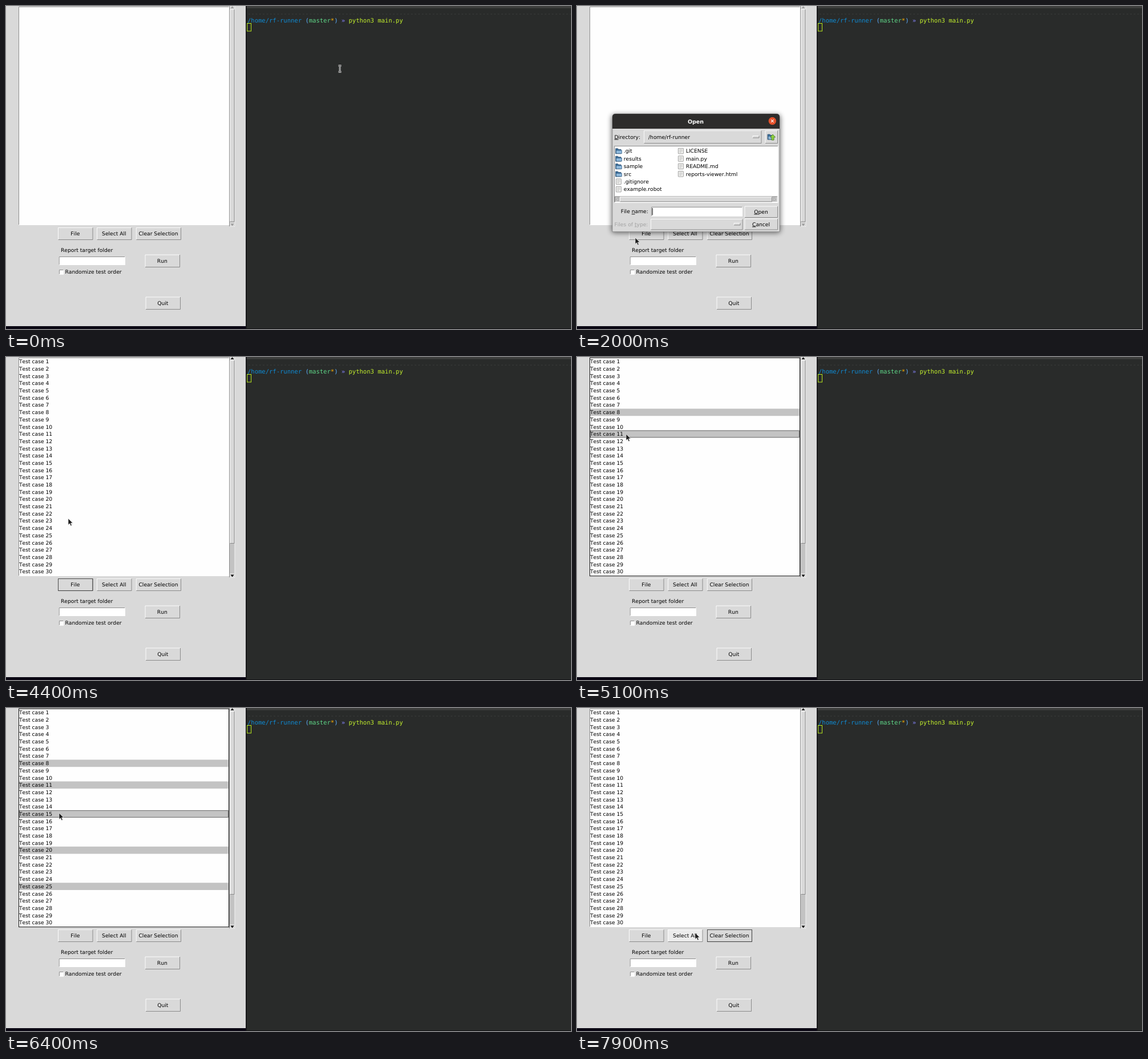
An HTML page for the animation above (8 s loop, 990 by 566 pixels).

```html
<!DOCTYPE html>
<html lang="en">
<head>
<meta charset="utf-8">
<title>Test runner</title>
<style>
html, body { margin: 0; width: 100%; height: 100%; overflow: hidden; background: #292b2a; }
svg { display: block; }
text { font: 9.165px "DejaVu Sans", sans-serif; font-kerning: none; text-rendering: geometricPrecision; white-space: pre; }
.mono { font: 10.53px "DejaVu Sans Mono", monospace; }
.title { font: bold 9.5px "DejaVu Sans", sans-serif; }
.mid { text-anchor: middle; }
u, .u { text-decoration: underline; }
</style>
</head>
<body>
<svg id="stage" width="990" height="566" viewBox="0 0 990 566"></svg>
<script>
const GREY = '#d9d9d9', DARK = '#828282', HOVER = '#ececec', PICK = '#c3c3c3';
const ROW = 12.69, TOP = 1.7, CASES = 30, LOOP = 8000, STEP = 100;

const rect = (x, y, w, h, fill, more = '') =>
  `<rect x="${x}" y="${y}" width="${w}" height="${h}" fill="${fill}" ${more}/>`;
const path = (d, more) => `<path d="${d}" ${more}/>`;
const text = (x, y, s, more = '') => `<text x="${x}" y="${y}" ${more}>${s}</text>`;
const under = c => `<tspan class="u">${c}</tspan>`;
const group = (id, body, more = '') => `<g id="${id}" ${more}>${body}</g>`;

// Tk style box: light and dark edges, swapped when sunken
function bevel(x, y, w, h, fill = GREY, sunken = false) {
  const edge = (d, c) => path(d, `fill="none" stroke="${c}" stroke-width=".9"`);
  const [a, b] = sunken ? [DARK, '#fff'] : ['#fff', DARK];
  const r = x + w - .5, t = y + .5, l = x + .5, m = y + h - .5;
  return rect(x, y, w, h, fill) + edge(`M${l} ${m}V${t}H${r}`, a) + edge(`M${l} ${m}H${r}V${t}`, b);
}

function button(id, x, y, w, h, label, base = 14) {
  return group(id, bevel(x, y, w, h) +
    rect(x + .6, y + .6, w - 1.2, h - 1.2, 'none', 'class="ring" stroke="#333" stroke-width=".9" visibility="hidden"') +
    text(x + w / 2 - .4, y + base, label, 'class="mid"'));
}

function terminal() {
  const words = [
    [0, '/home/rf-runner', '#0f8bd4'], [16, '(', '#5fafff'], [17, 'master', '#5fd787'], [23, '*', '#ffaf00'],
    [24, ')', '#5fafff'], [26, '»', '#8787ff'], [28, 'python3 main.py', '#c3f02d']
  ];
  return rect(420, 0, 570, 566, '#292b2a') + rect(420, 0, 570, 4, '#3d3e3d') +
    text(423, 16.5, '-'.repeat(90), 'class="mono" fill="#424342"') +
    words.map(([col, s, c]) => text(423 + col * 6.34, 29, s, `class="mono" fill="${c}"`)).join('') +
    rect(422.5, 30.5, 7, 13.5, 'none', 'stroke="#b5e61d"') +
    rect(420, 565, 570, 1, '#101012');
}

function scrollbar() {
  const arrow = (d, id) => path(d, `class="arrow" fill="#999"`);
  return bevel(391, -2, 10.5, 389, PICK, true) +
    group('thumbFull', bevel(392, 5.5, 8.5, 373)) +
    group('thumbPart', bevel(392, 5.5, 8.5, 321.5)) +
    rect(392, -1, 8.5, 6, GREY) + rect(392, 379, 8.5, 7.5, GREY) +
    arrow('M393.5 4H399.5L396.5 .5z') + arrow('M393.5 381.5H399.5L396.5 385.5z');
}

function mainWindow() {
  let rows = '';
  for (let i = 0; i < CASES; i++) {
    const y = TOP + i * ROW;
    rows += rect(23, y, 366.5, ROW, PICK, `id="pick${i + 1}" visibility="hidden"`) +
      text(23, y + 9.6, 'Test case ' + (i + 1));
  }
  return rect(0, 0, 420, 561, GREY) + rect(0, 561, 421, 5, '#0a0613') + rect(420, 0, 1.6, 566, '#131316') +
    bevel(22, 1, 369, 383, '#fefefe', true) + group('cases', rows) +
    rect(23.4, 0, 365.7, ROW - .8, 'none', 'id="active" stroke="#555" stroke-width=".8"') +
    rect(22.5, 1.4, 368, 382.3, 'none', 'id="listRing" stroke="#111" stroke-width="1"') +
    scrollbar() +
    button('file', 91, 388, 61.5, 22, 'File') +
    button('all', 159, 388, 61.5, 22, 'Select All') +
    button('clear', 227.8, 388, 79.2, 22, 'Clear Selection') +
    button('run', 243.5, 435.5, 61.5, 22.5, 'Run', 14.5) +
    button('quit', 244.5, 509.5, 61.5, 22.5, 'Quit', 14.5) +
    text(96, 431.3, 'Report target folder') + bevel(92.7, 439, 116.3, 15, '#fff', true) +
    bevel(93, 462, 8.2, 8.5, '#fff', true) + text(103.5, 469.3, 'Randomize test order');
}

const folder = (x, y) =>
  path(`M${x} ${y + 1}h4l1 1.5h4.5v7.5h-9.5z`, 'fill="#3b6f9c" stroke="#2c4a66" stroke-width=".7"') +
  rect(x + 1, y + 4.2, 9.8, 5.6, '#8fb9dc', 'stroke="#31597d" stroke-width=".7"');
const sheet = (x, y) =>
  rect(x + .8, y + .5, 9, 9.6, '#f4f4f2', 'stroke="#8a8a8a" stroke-width=".8" rx=".6"') +
  path(`M${x + 2.5} ${y + 3}h5.5m-5.5 2.2h5.5m-5.5 2.2h4`, 'stroke="#aaa" stroke-width=".8"');

function dialog() {
  const left = ['.git', 'results', 'sample', 'src', '.gitignore', 'example.robot'];
  const right = ['LICENSE', 'main.py', 'README.md', 'reports-viewer.html'];
  const files = (list, x, dirs) => list.map((s, i) => {
    const y = 253.8 + i * 13.4;
    return (i < dirs ? folder : sheet)(x, y - 5) + text(x + 14.2, y + 3.5, s, s === 'example.robot' ? 'id="robot"' : '');
  }).join('');
  const tri = d => path(d, 'fill="#c9c9c9" stroke="#999" stroke-width=".6"');
  return rect(60, 190, 297, 208, '#000', 'rx="6" opacity=".5" filter="url(#blur)"') +
    path('M62 395.5V194.500q0-5.500 5.500-5.500H349.500q5.500 0 5.500 5.500V395.500z', `fill="${GREY}" stroke="#666" stroke-width=".5"`) +
    path('M62 215V194.500q0-5.500 5.500-5.500H349.500q5.500 0 5.500 5.500V215z', 'fill="#2d2c2b"') +
    text(208, 205.6, 'Open', 'class="title mid" fill="#fff"') +
    '<circle cx="342.300" cy="201.500" r="6.700" fill="#e4512b"/>' +
    path('M340 199.200l4.600 4.600m0-4.600l-4.600 4.600', 'stroke="#fff" stroke-width="1.100"') +
    text(65.5, 232.5, under('D') + 'irectory:') +
    bevel(117, 218, 206.5, 23) + text(125, 232.5, '/home/rf-runner') + bevel(307.5, 227, 12, 4.5) +
    bevel(329.5, 218, 22.5, 23) + folder(334, 224) +
    path('M341 235v-5h-2.500l4.500-5 4.500 5h-2.500v5z', 'fill="#8fd13f" stroke="#3c6a17" stroke-width=".700"') +
    bevel(65, 245, 287.5, 100, '#fff', true) +
    rect(81.5, 315, 68.5, 12.5, '#4a6984', 'id="robotBack"') +
    files(left, 67.6, 4) + files(right, 176.6, 0) +
    bevel(66, 333.5, 285.5, 10.5, PICK, true) + bevel(75, 334.3, 267, 9) +
    tri('M72.500 336v5.500l-4.500-2.700z') + tri('M344.500 336v5.500l4.500-2.700z') +
    text(76.8, 363.3, 'File ' + under('n') + 'ame:') + bevel(130, 352, 160, 16.5, '#fff', true) +
    text(131.2, 363.3, 'example.robot', 'id="name"') + rect(131.7, 354, 1, 12.5, '#000', 'id="caret"') +
    bevel(293.5, 350.5, 58.5, 20.5) + text(322.5, 363.5, under('O') + 'pen', 'class="mid"') +
    text(65.5, 385.5, 'Files of ' + under('t') + 'ype:', 'fill="#a3a3a3"') +
    bevel(129, 373, 161.5, 19.5) + bevel(274.5, 380, 12, 4.5) +
    bevel(293.5, 372.5, 58.5, 20) + text(322.5, 385.5, under('C') + 'ancel', 'class="mid"');
}

const arrow = path('M0 0V11.200L2.600 8.800 4.400 12.900 6.300 12 4.600 8.100H8z',
  'fill="#1c1c1c" stroke="#eee" stroke-width=".700"');
const beamShape = 'M-2.500-5.500H-.700L0-5 .700-5.500H2.500M0-5V5M-2.500 5.500H-.700L0 5 .700 5.500H2.500';
const beam = path(beamShape, 'fill="none" stroke="#fff" stroke-width="2.600"') +
  path(beamShape, 'fill="none" stroke="#111" stroke-width=".900"');

const stage = document.getElementById('stage');
stage.innerHTML = '<filter id="blur" x="-20%" y="-20%" width="140%" height="140%"><feGaussianBlur stdDeviation="4"/></filter>' +
  terminal() + mainWindow() + group('dialog', dialog()) + group('arrow', arrow) + group('beam', beam);

const $ = id => document.getElementById(id);
const show = (id, on) => $(id).setAttribute('visibility', on ? 'inherit' : 'hidden');

// pointer stops: time, x, y
const route = [
  [0, 585, 110], [300, 585, 110], [400, 524, 119], [500, 524, 119], [600, 470, 160], [800, 150, 375],
  [900, 102, 401], [1100, 102, 401], [1200, 102, 406], [2000, 102, 406], [2200, 106, 375], [2500, 108, 319],
  [2600, 110, 318], [4300, 110, 319], [4400, 109, 283], [4500, 109, 283], [4600, 104, 210], [4800, 86, 95],
  [4900, 86, 97], [5000, 86, 134], [5100, 86, 135], [5300, 92, 247], [5500, 92, 247], [5600, 91, 310],
  [6000, 91, 310], [6100, 92, 235], [6200, 93, 184], [6500, 93, 184], [6600, 115, 220], [6800, 235, 365],
  [6900, 262, 391], [7600, 262, 391], [7700, 264, 390], [7800, 264, 390], [7900, 207, 394]
];
// list clicks: row, press, release
const clicks = [[8, 4800, 4900], [11, 5000, 5100], [20, 5300, 5400], [25, 5600, 5700], [15, 6200, 6400]];
const CLEAR_DOWN = 7000, CLEARED = 7100;

function pointer(t) {
  const i = route.findIndex(p => p[0] > t);
  if (i < 0) return route[route.length - 1].slice(1);
  const [a, b] = [route[i - 1], route[i]], k = (t - a[0]) / (b[0] - a[0]);
  return [a[1] + (b[1] - a[1]) * k, a[2] + (b[2] - a[2]) * k];
}

function paintButton(id, hover, focus) {
  $(id).querySelector('rect').setAttribute('fill', hover ? HOVER : GREY);
  $(id).querySelector('.ring').setAttribute('visibility', focus ? 'inherit' : 'hidden');
}

function render(t) {
  const within = (a, b) => t >= a && t < b;
  const [x, y] = pointer(t), inTerminal = x > 421;
  $('arrow').setAttribute('transform', `translate(${x} ${y})`);
  $('beam').setAttribute('transform', `translate(${x} ${y})`);
  show('arrow', !inTerminal);
  show('beam', inTerminal);

  const loaded = t >= 3400, listFocus = within(4800, CLEAR_DOWN);
  show('cases', loaded);
  show('thumbPart', loaded);
  show('thumbFull', !loaded);
  stage.querySelectorAll('.arrow').forEach(a => a.setAttribute('fill', loaded ? '#000' : '#999'));
  show('listRing', listFocus);

  let active = 0;
  for (const [row, down, up] of clicks) {
    show('pick' + row, within(down, CLEARED));
    if (t >= up) active = row;
  }
  show('active', active && listFocus);
  $('active').setAttribute('y', TOP + (active - 1) * ROW + .4);

  paintButton('file', within(900, 1900), within(1700, 1900) || within(3400, 4800));
  paintButton('clear', within(6900, 7900), t >= CLEAR_DOWN);
  paintButton('all', t >= 7900, false);

  // the window manager fades the dialog in and out
  const fading = within(1900, 2000) || within(3500, 3600);
  show('dialog', within(1900, 3600));
  $('dialog').setAttribute('opacity', fading ? .5 : 1);
  const picked = t >= 3200;
  show('robotBack', picked && t < 3600);
  $('robot').setAttribute('fill', picked ? '#fff' : '#000');
  show('name', picked && t < 3600);
  show('caret', within(1900, 2700));
}

function tick() {
  const t = performance.now() % LOOP;
  render(Math.floor(t / STEP) * STEP);
  requestAnimationFrame(tick);
}
tick();
</script>
</body>
</html>
```
